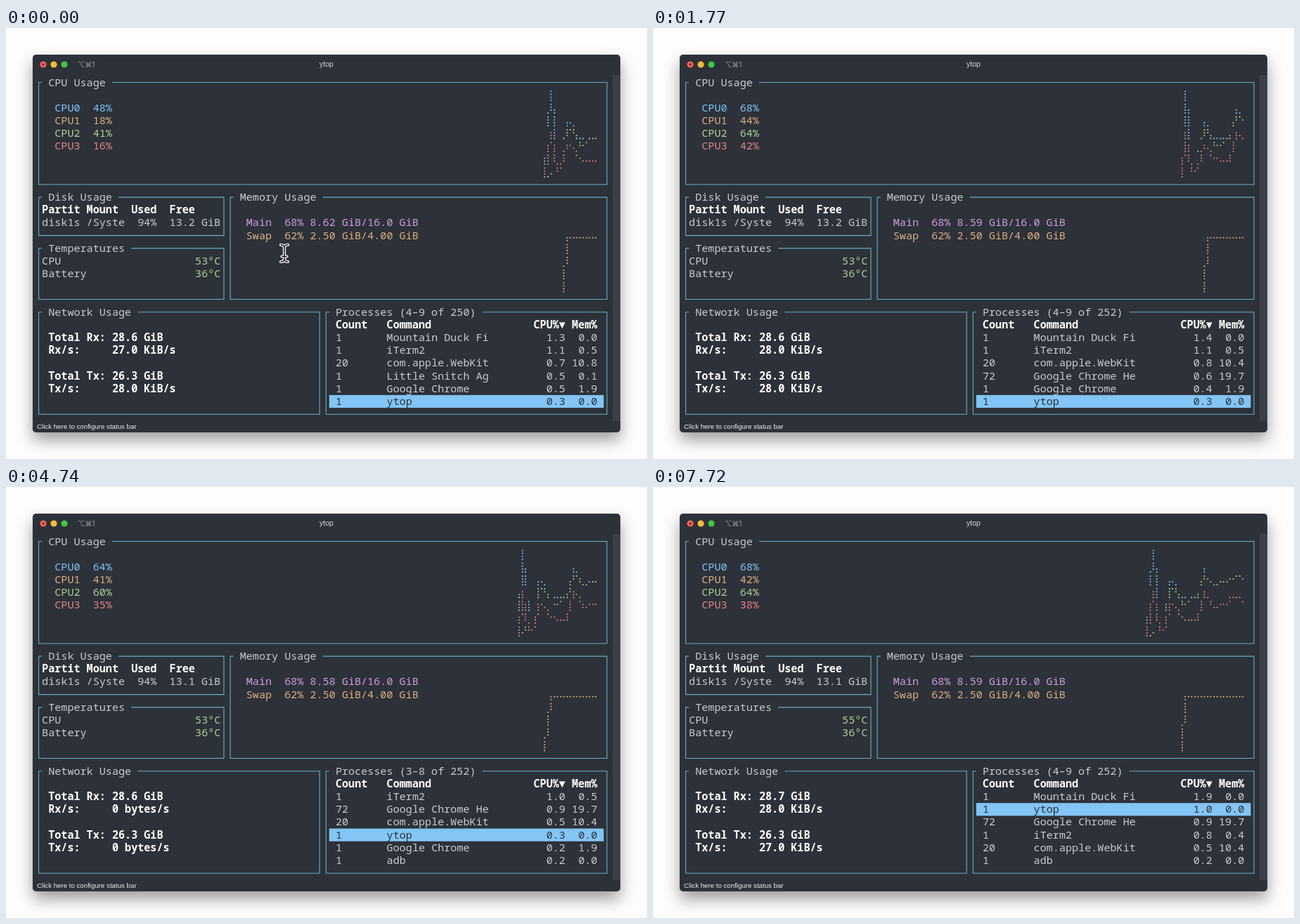
These frames come from a looping animation (912 by 614 pixels, 8000 ms). An HTML page:

```html
<!DOCTYPE html>
<html lang="en">
<head>
<meta charset="utf-8">
<title>ytop</title>
<style>
html, body { margin: 0; width: 100%; height: 100%; overflow: hidden; background: #fdfdfd; }
.window {
  position: absolute; left: 38px; top: 38px; width: 836px; height: 538px;
  border-radius: 5px; background: #2d3139;
  box-shadow: 0 0 1px rgba(0,0,0,.5), 0 11px 22px rgba(0,0,0,.38);
}
svg { position: absolute; left: 0; top: 0; }
text { white-space: pre; }
.term { font: 500 15.14px "Noto Sans Mono", "DejaVu Sans Mono", monospace; }
.term .b { font-weight: 700; }
.ui { font-family: "Liberation Sans", Arial, sans-serif; }
</style>
</head>
<body>
<div class="window"></div>
<svg id="stage" width="912" height="614" viewBox="0 0 912 614"></svg>
<script>
const CW = 9.084, RH = 18.18, LEFT = 42, LOOP = 8000;
const C = {
  bg: '#2d3139', text: '#c7ccd4', white: '#ffffff', border: '#64b1be', select: '#83c5f5',
  blue: '#7dc4f4', orange: '#dcb082', green: '#b1cf94', red: '#e4848a', purple: '#cf9fdf'
};
const CPU_COLORS = [C.blue, C.orange, C.green, C.red];

// Load per core, one value a second; the last nine belong to the visible states.
const LOAD = [
  [0, 98, 25, 25, 62, 58, 44, 43, 44, 48, 74.3, 68, 62, 66, 64, 70, 70, 68],
  [0, 52, 8, 11, 36, 31, 20, 18, 16, 18, 53, 44, 35, 39, 40.6, 44, 45, 42],
  [0, 3, 16, 20, 55, 54, 36, 37, 42, 41, 68, 64, 58, 60, 60, 66, 68, 64],
  [0, 50, 7, 10, 36, 31, 20, 17, 15, 16, 51, 42, 33, 34, 35, 41, 42, 38]
];
const FIRST = 9;

const DUCK = '1|Mountain Duck Fi|', TERM = '1|iTerm2|', KIT = '20|com.apple.WebKit|',
  CHROME = '1|Google Chrome|', HELPER = '72|Google Chrome He|', TOP = '1|ytop|', ADB = '1|adb|0.2|0.0';

const STATES = [
  { at: 0, free: 13.2, main: '8.62', temp: 53, total: 28.6, rx: '27.0 KiB', tx: '28.0 KiB', range: '4–9 of 250',
    rows: [DUCK + '1.3|0.0', TERM + '1.1|0.5', KIT + '0.7|10.8', '1|Little Snitch Ag|0.5|0.1', CHROME + '0.5|1.9', TOP + '0.3|0.0'] },
  { at: 690, free: 13.2, main: '8.58', temp: 53, total: 28.6, rx: '17.0 KiB', tx: '14.0 KiB', range: '5–10 of 251',
    rows: ['32|MTLCompilerServi|1.6|0.8', '1|Adguard|1.3|0.8', KIT + '1.0|10.4', HELPER + '1.0|19.7', '1|Activity Monitor|0.5|0.5', TOP + '0.4|0.0'] },
  { at: 1770, free: 13.2, main: '8.59', temp: 53, total: 28.6, rx: '28.0 KiB', tx: '28.0 KiB', range: '4–9 of 252',
    rows: [DUCK + '1.4|0.0', TERM + '1.1|0.5', KIT + '0.8|10.4', HELPER + '0.6|19.7', CHROME + '0.4|1.9', TOP + '0.3|0.0'] },
  { at: 2690, free: 13.2, main: '8.59', temp: 53, total: 28.6, rx: '1.00 KiB', tx: '1.00 KiB', range: '3–8 of 252',
    rows: [TOP + '1.1|0.0', TERM + '1.0|0.5', KIT + '0.5|10.4', HELPER + '0.3|19.7', ADB, CHROME + '0.2|1.9'] },
  { at: 3720, free: 13.1, main: '8.58', temp: 53, total: 28.6, rx: '28.0 KiB', tx: '28.0 KiB', range: '3–8 of 252',
    rows: [DUCK + '1.5|0.0', TERM + '1.1|0.5', HELPER + '0.8|19.7', KIT + '0.7|10.4', TOP + '0.3|0.0', CHROME + '0.3|1.9'] },
  { at: 4740, free: 13.1, main: '8.58', temp: 53, total: 28.6, rx: '0 bytes', tx: '0 bytes', range: '3–8 of 252',
    rows: [TERM + '1.0|0.5', HELPER + '0.9|19.7', KIT + '0.5|10.4', TOP + '0.3|0.0', CHROME + '0.2|1.9', ADB] },
  { at: 5720, free: 13.1, main: '8.60', temp: 53, total: 28.7, rx: '28.0 KiB', tx: '28.0 KiB', range: '4–9 of 252',
    rows: [HELPER + '1.8|19.7', TERM + '1.8|0.4', '1|Finder|1.1|0.8', CHROME + '0.6|1.9', KIT + '0.5|10.4', TOP + '0.4|0.0'] },
  { at: 6740, free: 13.1, main: '8.59', temp: 53, total: 28.7, rx: '1.00 KiB', tx: '1.00 KiB', range: '4–9 of 252',
    rows: [HELPER + '1.2|19.7', TERM + '1.1|0.4', CHROME + '0.6|1.9', KIT + '0.5|10.4', TOP + '0.3|0.0', ADB] },
  { at: 7720, free: 13.1, main: '8.59', temp: 55, total: 28.7, rx: '28.0 KiB', tx: '27.0 KiB', range: '4–9 of 252',
    rows: [DUCK + '1.9|0.0', TOP + '1.0|0.0', HELPER + '0.9|19.7', TERM + '0.8|0.4', KIT + '0.5|10.4', ADB] }
];

// Mouse pointer: time, x, y; it is hidden after the last step.
const POINTER = [[0, 396, 321], [860, 403, 380], [915, 418, 500], [970, -50, -50]];

const colX = c => LEFT + c * CW;
const midY = r => 77.5 + r * RH;
const put = (col, row, str, fill = C.text, cls = '') =>
  `<text class="${cls}" x="${colX(col).toFixed(2)}" y="${(midY(row) + 5).toFixed(2)}" fill="${fill}">${str}</text>`;
const bold = (col, row, str) => put(col, row, str, C.white, 'b');

function box(c0, r0, c1, r1, title) {
  const x0 = colX(c0 + .5), x1 = colX(c1 + .5), y0 = midY(r0), y1 = midY(r1);
  return `<path d="M${colX(c0 + 1)} ${y0}H${x0}V${y1}H${x1}V${y0}H${colX(c0 + 3 + title.length)}"
    fill="none" stroke="${C.border}" stroke-width="1.1"/>` + put(c0 + 2, r0, title);
}

function line(x1, y1, x2, y2, plot) {
  const dx = Math.abs(x2 - x1), dy = Math.abs(y2 - y1), steep = dy >= dx;
  if (steep ? y1 > y2 : x1 > x2) [x1, y1, x2, y2] = [x2, y2, x1, y1];
  const [long, short] = steep ? [dy, dx] : [dx, dy];
  const dir = Math.sign(steep ? x2 - x1 : y2 - y1);
  let d = 2 * short - long, side = 0;
  for (let i = 0; i <= long; i++) {
    steep ? plot(x1 + side, y1 + i) : plot(x1 + i, y1 + side);
    if (d > 0) { side += dir; d -= 2 * long; }
    d += 2 * short;
  }
}

// Braille chart: a later series replaces the whole character cell of an earlier one.
function chart(col, row, width, series) {
  const cells = new Map(), scale = (width * 2 - 1) / 101;
  for (const { data, color } of series) {
    const layer = new Map(), last = data.length - 1;
    const px = i => Math.floor((100 - last + i) * scale);
    const py = v => Math.floor((100 - v) * 27 / 100);
    const plot = (x, y) => {
      const key = (x >> 1) + ',' + (y >> 2);
      if (!layer.has(key)) layer.set(key, { color, dots: new Set() });
      const cx = colX(col + (x >> 1) + .5) + (x & 1 ? 2.1 : -2.1);
      const cy = midY(row + (y >> 2)) + 1 + ((y & 3) - 1.5) * 4.1;
      layer.get(key).dots.add(`M${cx.toFixed(1)} ${cy.toFixed(1)}h.01`);
    };
    for (let i = 0; i < last; i++) line(px(i), py(data[i]), px(i + 1), py(data[i + 1]), plot);
    layer.forEach((cell, key) => cells.set(key, cell));
  }
  return [...cells.values()].map(({ color, dots }) =>
    `<path d="${[...dots].join('')}" stroke="${color}" stroke-width="2.1" stroke-linecap="round"/>`).join('');
}

function processRow(entry, i) {
  const [count, name, cpu, mem] = entry.split('|'), row = 20 + i, on = name === 'ytop';
  const fill = on ? C.bg : C.text;
  const bar = on ? `<rect x="${colX(46)}" y="${midY(row) - RH / 2}" width="${43 * CW}" height="${RH}" fill="${C.select}"/>` : '';
  return bar + put(47, row, count, fill) + put(55, row, name, fill) +
    put(80, row, cpu, fill) + put(88 - mem.length, row, mem, fill);
}

function drawState(s, i) {
  const end = FIRST + i + 1;
  const flat = v => Array.from({ length: end }, (_, k) => k ? v : 0);
  return `<g class="state" visibility="hidden">` +
    chart(1, 1, 88, LOAD.map((d, k) => ({ data: d.slice(0, end), color: CPU_COLORS[k] }))) +
    LOAD.map((d, k) => put(3, 2 + k, `CPU${k}  ${Math.round(d[end - 1])}%`, CPU_COLORS[k])).join('') +
    put(1, 11, `disk1s /Syste  94%  ${s.free} GiB`) +
    put(25, 14, s.temp + '°C', C.green) +
    chart(31, 10, 58, [{ data: flat(68), color: C.purple }, { data: flat(62.5), color: C.orange }]) +
    put(33, 11, `Main  68% ${s.main} GiB/16.0 GiB`, C.purple) +
    bold(2, 20, `Total Rx: ${s.total} GiB`) + bold(2, 21, `Rx/s:     ${s.rx}/s`) + bold(2, 24, `Tx/s:     ${s.tx}/s`) +
    box(45, 18, 89, 26, `Processes (${s.range})`) +
    s.rows.map(processRow).join('') + '</g>';
}

const light = (x, fill) => `<circle cx="${x}" cy="52" r="4.6" fill="${fill}"/>`;
const chrome = `<g class="ui">
  ${light(53, '#ed6459')}${light(68, '#f4bd3c')}${light(83, '#3fc644')}
  <circle cx="53" cy="52" r="1.5" fill="#7c130d"/>
  <text x="102" y="55.5" font-size="10" fill="#9a9fa6" style="font-family:Inter,'DejaVu Sans',sans-serif">⌥⌘1</text>
  <text x="456" y="55" font-size="10.5" fill="#d3d6da" text-anchor="middle">ytop</text>
  <rect x="863" y="67" width="11" height="493" fill="#3a3f48"/>
  <text x="44" y="571" font-size="9.7" fill="#eceef0">Click here to configure status bar</text></g>`;

const fixed = box(0, 0, 89, 8, 'CPU Usage') + box(0, 9, 29, 12, 'Disk Usage') +
  box(0, 13, 29, 17, 'Temperatures') + box(30, 9, 89, 17, 'Memory Usage') + box(0, 18, 44, 26, 'Network Usage') +
  bold(1, 10, 'Partit Mount  Used  Free') +
  put(1, 14, 'CPU') + put(1, 15, 'Battery') + put(25, 15, '36°C', C.green) +
  put(33, 12, 'Swap  62% 2.50 GiB/4.00 GiB', C.orange) + bold(2, 23, 'Total Tx: 26.3 GiB') +
  bold(47, 19, 'Count') + bold(55, 19, 'Command') + bold(78, 19, 'CPU%▼') + bold(84, 19, 'Mem%');

const beam = 'M-5-12Q0-12 0-8V8Q0 12-5 12M5-12Q0-12 0-8M0 8Q0 12 5 12M-3.5 4.5H3.5';
const pointerArt = `<g id="pointer" fill="none" stroke-linecap="round">
  <path d="${beam}" stroke="#fff" stroke-width="4.2"/><path d="${beam}" stroke="#16181c" stroke-width="1.5"/></g>`;

const stage = document.getElementById('stage');
stage.innerHTML = chrome + `<g class="term">${fixed}${STATES.map(drawState).join('')}</g>` + pointerArt;
const groups = [...stage.querySelectorAll('.state')];
const pointer = document.getElementById('pointer');

function render() {
  const t = performance.now() % LOOP;
  const now = STATES.findLastIndex(s => s.at <= t);
  groups.forEach((g, i) => g.setAttribute('visibility', i === now ? 'visible' : 'hidden'));
  const [, x, y] = POINTER.findLast(p => p[0] <= t);
  pointer.setAttribute('transform', `translate(${x} ${y})`);
  requestAnimationFrame(render);
}
render();
</script>
</body>
</html>
```
